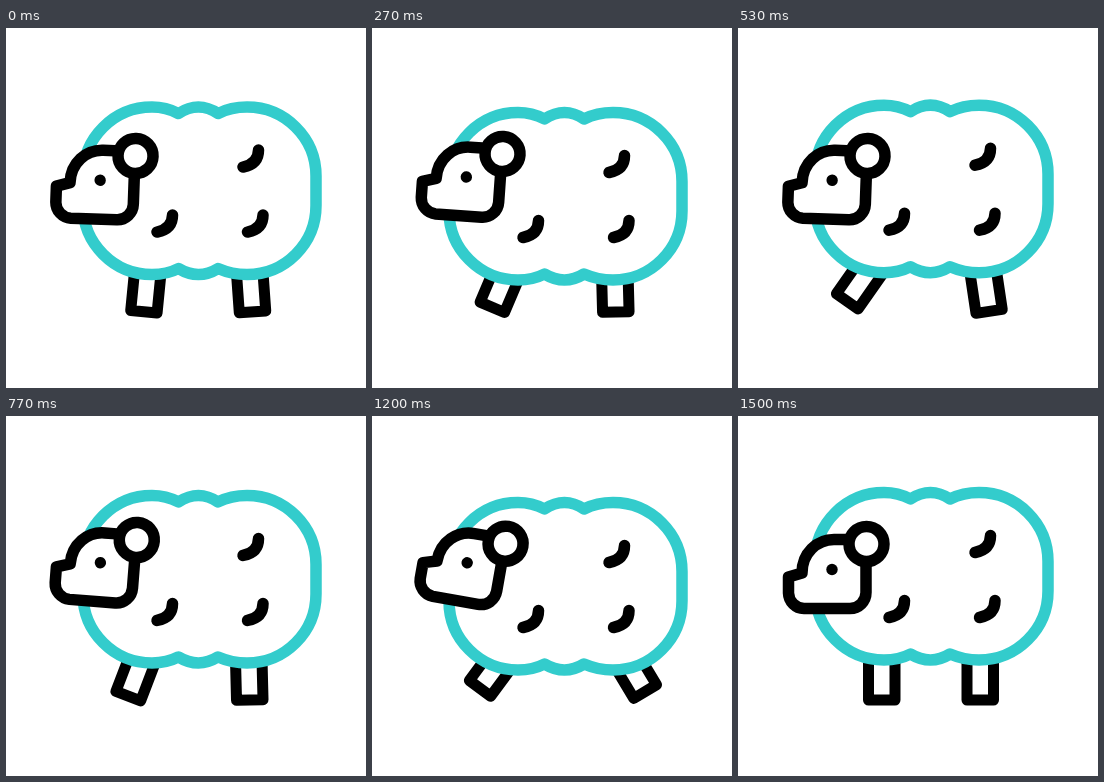
Animation of 360 by 360 pixels, one loop 1.67 s. Source, as an HTML page without scripts:

```html
<!DOCTYPE html>
<html lang="en">
<head>
<meta charset="utf-8">
<title>Trotting sheep</title>
<style>
  @property --sink { syntax: "<number>"; inherits: true; initial-value: 0; }
  @property --bob { syntax: "<number>"; inherits: true; initial-value: 0; }
  @property --nod { syntax: "<angle>"; inherits: true; initial-value: 0deg; }
  @property --front { syntax: "<angle>"; inherits: true; initial-value: 0deg; }
  @property --hind { syntax: "<angle>"; inherits: true; initial-value: 0deg; }

  html, body { margin: 0; height: 100%; overflow: hidden; background: #fff; }
  svg {
    display: block; width: 100%; height: 100%;
    fill: none; stroke: #000; stroke-width: 11.5; stroke-linejoin: round;
    --slow: cubic-bezier(.33, .52, .64, 1);
    --fast: cubic-bezier(.36, 0, .67, .48);
    animation: trot 1670ms infinite;
  }
  .leg { stroke-width: 11; }
  .front { transform-origin: 143.5px 224px; transform: rotate(var(--front)); }
  .hind { transform-origin: 242.5px 224px; transform: rotate(var(--hind)); }
  .body { transform: translateY(calc(var(--sink) * 1px)); }
  .wool { fill: #fff; stroke: #3cc; }
  .curl { stroke-linecap: round; }
  .head {
    fill: #fff;
    transform-origin: 130px 157px;
    transform: translateY(calc(var(--bob) * 1px)) rotate(var(--nod));
  }
  .eye { fill: #000; stroke: none; }

  /* Two strides, then a crouch that settles into a short rest */
  @keyframes trot {
    0% { --sink: 2.5; --bob: 0; --nod: 2deg; --front: 5.5deg; --hind: -4deg; animation-timing-function: var(--slow); }
    8% { --sink: 10; --bob: 0; --nod: 9deg; --front: 37deg; --hind: -31deg; animation-timing-function: var(--fast); }
    16.17% { --sink: 8; --bob: -2; --nod: 4deg; --front: 23deg; --hind: -1.5deg; animation-timing-function: ease-in-out; }
    24% { --sink: -6.5; --bob: -2; --nod: 0deg; --front: 0deg; --hind: 12deg; animation-timing-function: ease-in-out; }
    31.74%, 34.13% { --sink: .7; --bob: 0; --nod: 2deg; --front: 35deg; --hind: -8.5deg; animation-timing-function: var(--slow); }
    40% { --sink: 10; --bob: -1; --nod: 9deg; --front: 37deg; --hind: -31deg; animation-timing-function: var(--fast); }
    46.11% { --sink: 3; --bob: -4; --nod: 4.5deg; --front: 21deg; --hind: -1.5deg; animation-timing-function: var(--slow); }
    54.5% { --sink: -6.5; --bob: -2; --nod: 0deg; --front: 0deg; --hind: 12deg; animation-timing-function: var(--fast); }
    61.68% { --sink: -.3; --bob: .3; --nod: 1deg; --front: 18.5deg; --hind: -11deg; animation-timing-function: linear; }
    64.07%, 65.87% { --sink: 2; --bob: 0; --nod: 2.5deg; --front: 28deg; --hind: -14deg; animation-timing-function: var(--slow); }
    71.86% { --sink: 10; --bob: -.5; --nod: 10deg; --front: 36.5deg; --hind: -31deg; animation-timing-function: ease-in-out; }
    89.82%, 100% { --sink: 0; --bob: 0; --nod: 0deg; --front: 0deg; --hind: 0deg; }
  }
</style>
</head>
<body>
<svg viewBox="0 0 360 360">
  <defs>
    <path id="curl" d="M0 0Q0 14-15.5 17"/>
  </defs>
  <path class="leg front" d="M130.500 224V284H157V224"/>
  <path class="leg hind" d="M229 224V284H255.500V224"/>
  <g class="body">
    <path class="wool" d="M172.500 83Q160 76.500 146 76.500A69 69 0 0 0 77 145.500V175A69 69 0 0 0 146 244Q161 244 172.500 238Q192.500 250 212 238Q226 244 241 244A69 69 0 0 0 310 175V145.500A69 69 0 0 0 241 76.500Q225 76.500 212 83Q192.500 70 172.500 83Z"/>
    <g class="curl">
      <use href="#curl" x="252.500" y="119.500"/>
      <use href="#curl" x="166.500" y="184.500"/>
      <use href="#curl" x="257" y="184.500"/>
    </g>
  </g>
  <g class="head">
    <path d="M108 123.500H96C79 123.500 64 137 64 157L50.500 161V177A16 16 0 0 0 66 192.500H112A16 16 0 0 0 128 176.500V146"/>
    <circle cx="128.500" cy="128" r="17.500"/>
    <circle class="eye" cx="94" cy="153.500" r="5.700"/>
  </g>
</svg>
</body>
</html>
```
